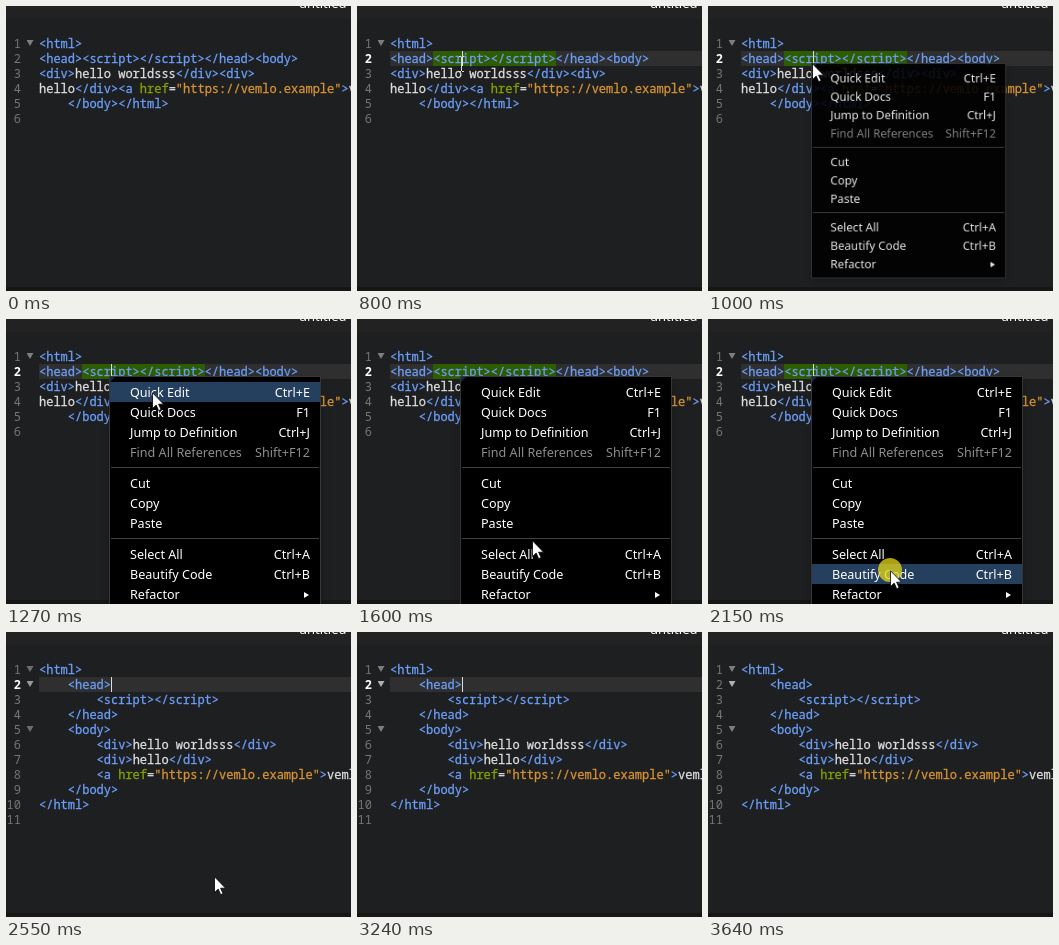
Animation, 345 px wide and 285 px high, one loop 3710 ms. Source, as an HTML page:

```html
<!DOCTYPE html>
<html lang="en">
<head>
<meta charset="utf-8">
<title>Beautify code</title>
<style>
html, body { margin: 0; width: 100%; height: 100%; overflow: hidden; background: #1d1f21; }
#stage { position: relative; width: 345px; height: 285px; overflow: hidden; background: #1d1f21; }
#stage > *, #menu > .hover { position: absolute; }

.anim { animation: 3710ms step-end infinite; }

.top { left: 0; top: 0; width: 345px; height: 13px; background: #222; }
.bottom { left: 0; top: 281px; width: 345px; height: 4px; background: #161616; }
.title { left: 293px; top: -14px; font: 13px/22px "Noto Sans", sans-serif; color: #fff; white-space: nowrap; }

pre { margin: 0; top: 30px; font: 500 12px/15px "Noto Sans Mono", monospace; color: #ddd; }
.code { left: 33px; -webkit-text-stroke: .3px; }
.nums { left: 0; width: 15px; text-align: right; color: #767676; font-weight: 400; }
b { font-weight: inherit; color: #6c9ef8; }
i { font-style: normal; color: #85a300; }
s { text-decoration: none; color: #d89333; }

.before { animation-name: before; }
.after { animation-name: after; }
@keyframes before { 0% { opacity: 1 } 59.56%, 100% { opacity: 0 } }
@keyframes after { 0% { opacity: 0 } 59.56%, 100% { opacity: 1 } }

.band { left: 33px; top: 45px; width: 312px; height: 15px; background: #2f2f2f; animation-name: focus; }
@keyframes focus { 0%, 98.11%, 100% { opacity: 0 } 21.56% { opacity: 1 } }
.match { left: 76px; top: 45px; width: 123px; height: 15px; background: #2e5c00; animation-name: match; }
@keyframes match { 0%, 59.56%, 100% { opacity: 0 } 21.56% { opacity: 1 } }
.cur { animation-name: cur; }
@keyframes cur {
  0%, 98.11%, 100% { color: #767676; font-weight: 400 }
  21.56% { color: #fff; font-weight: 700 }
}
.caret { left: 105px; top: 45px; width: 1px; height: 15px; background: #ddd; animation-name: caret; }
@keyframes caret {
  0%, 36.11%, 73.85%, 98.11%, 100% { opacity: 0 }
  21.56%, 54.17%, 87.33% { opacity: 1 }
}

.fold { left: 20.5px; width: 7px; height: 6px; background: #7d7d7d; clip-path: polygon(0 0, 100% 0, 50% 100%); }
.new { animation: fold 3710ms linear infinite; }
@keyframes fold {
  0%, 59.56% { opacity: 0 }
  68.73% { opacity: .85 }
  76.01%, 100% { opacity: 1 }
}

#menu {
  left: 104px; top: 58px; width: 210px; height: 232px; padding: 6px 0 4px; box-sizing: border-box;
  background: #000; box-shadow: 0 0 0 1px #363636, 0 3px 9px rgba(0, 0, 0, .24); transform-origin: 0 0;
  font: 12.6px/20px "Noto Sans", sans-serif; color: #fff; animation-name: menu;
}
#menu::before {
  content: ""; position: absolute; left: 0; top: 0; width: 5px; height: 5px;
  background: #1c2742; clip-path: polygon(0 0, 100% 0, 0 100%);
}
@keyframes menu {
  0%, 59.56%, 100% { opacity: 0; transform: none }
  25.06% { opacity: .7; transform: scale(.74) }
  26.95% { opacity: .9; transform: scale(.92) }
  28.84% { opacity: .98; transform: scale(.98) }
  30.45% { opacity: 1; transform: none }
}
.row { position: relative; display: flex; justify-content: space-between; height: 20px; padding: 0 10px 0 20px; white-space: nowrap; }
.off { color: #8e8e8e; }
.sep { position: relative; height: 11px; }
.sep::after { content: ""; position: absolute; left: 1px; right: 1px; top: 4px; height: 1px; background: #404040; }
.sub { width: 5px; height: 6px; margin: 7px 1px 0 0; background: #fff; clip-path: polygon(0 0, 100% 50%, 0 100%); }
.hover { left: 0; top: 0; width: 210px; height: 20px; background: #25405e; animation-name: hover; }
@keyframes hover {
  0%, 39.62%, 43.12%, 59.56%, 100% { opacity: 0; top: 5px }
  34.23% { opacity: 1; top: 5px }
  36.11% { opacity: 1; top: 25px }
  37.73% { opacity: 1; top: 45px }
  41.24% { opacity: 1; top: 116px }
  45.01% { opacity: 1; top: 167px }
  46.63% { opacity: 1; top: 187px }
}

.click { left: 170px; top: 239px; width: 24px; height: 24px; border-radius: 50%; background: rgba(230, 215, 25, .75); animation-name: click; }
@keyframes click { 0%, 59.56%, 100% { opacity: 0 } 54.17% { opacity: 1 } }

svg { left: 0; top: 0; overflow: visible; }
.beam { animation-name: beam; }
@keyframes beam {
  0%, 25.06%, 100% { opacity: 0; transform: translate(104px, 58px) }
  7% { opacity: 1; transform: translate(260px, 177px) }
  8.89% { opacity: 1; transform: translate(222px, 150px) }
  10.78% { opacity: 1; transform: translate(177px, 116px) }
  12.66% { opacity: 1; transform: translate(139px, 83px) }
  14.55% { opacity: 1; transform: translate(113px, 64px) }
  16.17% { opacity: 1; transform: translate(104px, 58px) }
}
.arrow { animation-name: arrow; }
@keyframes arrow {
  0%, 76.01%, 100% { opacity: 0; transform: translate(208px, 244px) }
  25.06% { opacity: 1; transform: translate(104px, 57px) }
  34.23% { opacity: 1; transform: translate(146px, 73px) }
  36.11% { opacity: 1; transform: translate(151px, 86px) }
  37.73% { opacity: 1; transform: translate(156px, 110px) }
  39.62% { opacity: 1; transform: translate(162px, 140px) }
  41.24% { opacity: 1; transform: translate(169px, 181px) }
  43.12% { opacity: 1; transform: translate(175px, 221px) }
  45.01% { opacity: 1; transform: translate(180px, 241px) }
  46.63% { opacity: 1; transform: translate(182px, 250px) }
  48.51% { opacity: 1; transform: translate(182px, 251px) }
  63.07% { opacity: 1; transform: translate(188px, 250px) }
  64.95% { opacity: 1; transform: translate(198px, 247px) }
  66.84% { opacity: 1; transform: translate(206px, 245px) }
  68.73% { opacity: 1; transform: translate(208px, 244px) }
}
</style>
</head>
<body>
<div id="stage">
  <div class="top"></div>
  <div class="title">untitled</div>
  <div class="bottom"></div>
  <div class="band anim"></div>
  <div class="match anim"></div>

  <pre class="nums before anim">1
<span class="cur anim">2</span>
3
4
5
6</pre>
  <pre class="code before anim"><b>&lt;html&gt;</b>
<b>&lt;head&gt;&lt;script&gt;&lt;/script&gt;&lt;/head&gt;&lt;body&gt;</b>
<b>&lt;div&gt;</b>hello worldsss<b>&lt;/div&gt;&lt;div&gt;</b>
hello<b>&lt;/div&gt;&lt;a </b><i>href</i>=<s>"https://vemlo.example"</s><b>&gt;</b>vemlo<b>&lt;/a&gt;</b>
    <b>&lt;/body&gt;&lt;/html&gt;</b></pre>

  <pre class="nums after anim">1
<span class="cur anim">2</span>
3
4
5
6
7
8
9
10
11</pre>
  <pre class="code after anim"><b>&lt;html&gt;</b>
    <b>&lt;head&gt;</b>
        <b>&lt;script&gt;&lt;/script&gt;</b>
    <b>&lt;/head&gt;</b>
    <b>&lt;body&gt;</b>
        <b>&lt;div&gt;</b>hello worldsss<b>&lt;/div&gt;</b>
        <b>&lt;div&gt;</b>hello<b>&lt;/div&gt;</b>
        <b>&lt;a </b><i>href</i>=<s>"https://vemlo.example"</s><b>&gt;</b>vemlo<b>&lt;/a&gt;</b>
    <b>&lt;/body&gt;</b>
<b>&lt;/html&gt;</b></pre>

  <div class="fold before anim" style="top:34px"></div>
  <div class="fold new" style="top:34px"></div>
  <div class="fold new" style="top:49px;background:#b0b0b0"></div>
  <div class="fold new" style="top:94px"></div>
  <div class="caret anim"></div>

  <div id="menu" class="anim">
    <div class="hover anim"></div>
    <div class="row"><span>Quick Edit</span><span>Ctrl+E</span></div>
    <div class="row"><span>Quick Docs</span><span>F1</span></div>
    <div class="row"><span>Jump to Definition</span><span>Ctrl+J</span></div>
    <div class="row off"><span>Find All References</span><span>Shift+F12</span></div>
    <div class="sep"></div>
    <div class="row"><span>Cut</span></div>
    <div class="row"><span>Copy</span></div>
    <div class="row"><span>Paste</span></div>
    <div class="sep"></div>
    <div class="row"><span>Select All</span><span>Ctrl+A</span></div>
    <div class="row"><span>Beautify Code</span><span>Ctrl+B</span></div>
    <div class="row"><span>Refactor</span><span class="sub"></span></div>
  </div>

  <div class="click anim"></div>
  <svg class="beam anim" width="1" height="1">
    <path d="M-2 -7.5H0M1 -7.5H3M.5 -7V7M-2 7.5H0M1 7.5H3" stroke="#ddd" fill="none"/>
  </svg>
  <svg class="arrow anim" width="1" height="1">
    <path d="M.5 .8V16.6L4.2 13.1L6.7 18.7L9.1 17.6L6.6 12.2H11.6Z" fill="#fff" stroke="#000" stroke-width=".8"/>
  </svg>
</div>
</body>
</html>
```
